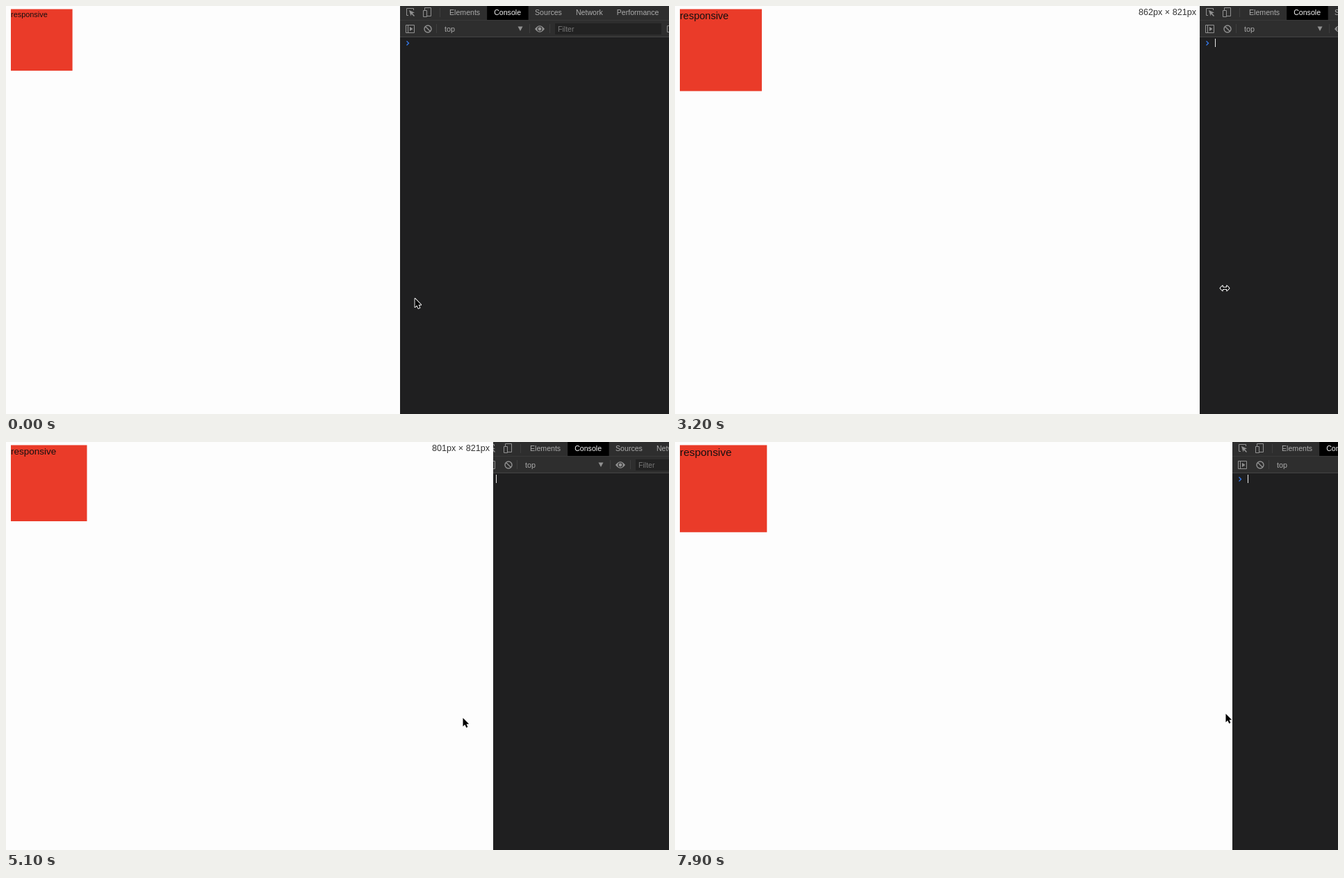
Write an HTML page with a canvas that moves like this. It is 954 px wide and 587 px high and loops after 8 s.

```html
<!DOCTYPE html>
<html lang="en">
<head>
<meta charset="utf-8">
<title>Responsive box</title>
<style>
  html, body { margin: 0; width: 100%; height: 100%; overflow: hidden; background: #fdfdfd; }
  canvas { display: block; }
</style>
</head>
<body>
<canvas width="954" height="587"></canvas>
<script>
const LOOP = 8000, STEP = 100, PX_SCALE = 0.8755;
const GRAB = 1400, RELEASE = 7900, PAGE_LAG = 300, PANEL_LAG = 180;
const GREY = '#919191', LABEL = '#ababab', BAR = '#2e2e2e';
const ctx = document.querySelector('canvas').getContext('2d');

// Pointer path as [ms, x, y]; page and panel follow it with a delay.
const path = [
  [600, 588, 420], [GRAB, 567.3, 388], [1650, 569, 388], [1800, 584, 387],
  [2900, 755, 402], [3200, 791, 406], [3650, 822, 407], [4200, 781, 405],
  [4500, 738, 404], [4800, 701, 400], [5100, 657, 396], [5800, 631, 397],
  [6100, 612, 398], [6250, 606, 398], [6900, 802, 399], [7800, 802, 399],
  [RELEASE, 792, 390]
];

function pointer(t) {
  const i = path.findIndex(p => p[0] >= t);
  if (i === 0) return { x: path[0][1], y: path[0][2] };
  if (i < 0) return { x: path.at(-1)[1], y: path.at(-1)[2] };
  const [t0, x0, y0] = path[i - 1], [t1, x1, y1] = path[i];
  const u = (t - t0) / (t1 - t0);
  return { x: x0 + (x1 - x0) * u, y: y0 + (y1 - y0) * u };
}

const follow = (t, lag) => pointer(Math.max(GRAB, t - lag)).x;

function rect(x, y, w, h, color) {
  ctx.fillStyle = color;
  ctx.fillRect(x, y, w, h);
}

// Draws text and returns its width.
function text(string, x, y, size, color, align = 'left') {
  ctx.font = `${size}px "Liberation Sans", Arial, sans-serif`;
  ctx.textAlign = align;
  ctx.fillStyle = color;
  ctx.fillText(string, x, y);
  return ctx.measureText(string).width;
}

function stroke(d, color = GREY, width = 1) {
  ctx.strokeStyle = color;
  ctx.lineWidth = width;
  ctx.stroke(new Path2D(d));
}

function fill(d, color = GREY) {
  ctx.fillStyle = color;
  ctx.fill(new Path2D(d));
}

function drawTabs() {
  let x = 71;
  for (const name of ['Elements', 'Console', 'Sources', 'Network', 'Performance']) {
    const active = name === 'Console';
    if (active) rect(x - 10, 0, 59.5, 20, '#000');
    x += 20 + text(name, x, 12.5, 10.6, active ? '#f2f2f2' : LABEL);
  }
}

function drawIcons() {
  // Inspect and device
  stroke('M12 13.5H9.5V3.5H19.5V6');
  fill('M13 6L21 9.5L17.8 10.5L21 14L20 15L16.5 11.5L15.5 14.5Z');
  stroke('M35.5 6V2.5H44.5V14.5H39M33.5 6.5H38.5V15.5H33.5Z');
  // Sidebar, clear and eye
  stroke('M8.5 27.5H20.5V38.5H8.5ZM11.5 27.5V38.5');
  fill('M14 30L18.5 33L14 36Z');
  stroke('M35 33a5 5 0 1 0 10 0a5 5 0 1 0-10 0M36.5 29.5L43.5 36.5', GREY, 1.4);
  fill('M194 33Q201 23.5 208 33Q201 42.5 194 33Z');
  stroke('M198 33a3 3 0 1 0 6 0a3 3 0 1 0-6 0', BAR, 1.2);
}

function drawPanel(left, caretOn) {
  ctx.save();
  ctx.translate(Math.floor(left), 0);
  rect(0, 0, 954, 587, '#1f1f20');
  rect(0, 0, 954, 44, BAR);
  rect(0, 20, 954, 1, '#3a3a3a');
  rect(0, 44, 954, 1, '#444');
  drawTabs();
  drawIcons();

  rect(57, 3, 1, 13, '#3e3e3e');
  for (const x of [52, 186, 215]) rect(x, 26, 1, 13, '#3e3e3e');
  text('top', 64, 36.5, 10.8, LABEL);
  fill('M169.5 29.5H176.5L173 36Z');
  rect(223, 25, 153, 16, '#222');
  text('Filter', 227, 37, 10.6, '#777');
  stroke('M390 28.5H384.5V37.5H390');

  stroke('M9.5 50.5L12.5 53.5L9.5 56.5', '#367cf1', 1.3);
  if (caretOn) rect(22, 47, 1, 12, '#e8e8e8');
  ctx.restore();
}

function drawPage(width, showSize) {
  rect(0, 0, Math.floor(width), 587, '#fdfdfd');
  const side = width * 0.1562, size = width * 0.01925;
  rect(7, 4.5, side, side, '#ea3b29');
  text('responsive', 7, 4.5 + size * 1.03, size, '#151010');
  if (showSize) {
    text(`${Math.round(width / PX_SCALE)}px × 821px`, width - 5, 13, 12.6, '#333', 'right');
  }
}

function drawPointer({ x, y }, resizing) {
  ctx.save();
  ctx.translate(x, y);
  ctx.lineJoin = 'round';
  const shape = resizing
    ? 'M-6.5 0L-3 -3.5V-1H3V-3.5L6.5 0L3 3.5V1H-3V3.5Z'
    : 'M.5 1V13.2L3.3 10.6L5.3 15L7.4 14.1L5.5 9.8H9.2Z';
  stroke(shape, '#fff', 1.8);
  fill(shape, '#000');
  ctx.restore();
}

function draw(now) {
  const t = Math.floor(now % LOOP / STEP) * STEP;
  const width = follow(t, PAGE_LAG);
  const left = Math.min(width, follow(t, PANEL_LAG));
  const hand = pointer(t);
  const held = t >= GRAB && t < RELEASE;
  const caretOn = t >= 700 && (t - 700) % 1000 < 520;

  drawPanel(left, caretOn);
  drawPage(width, held && t >= 1700);
  // Far over the page the resize handle loses the pointer.
  drawPointer(hand, held && hand.x > left - 16);
  requestAnimationFrame(draw);
}
requestAnimationFrame(draw);
</script>
</body>
</html>
```
